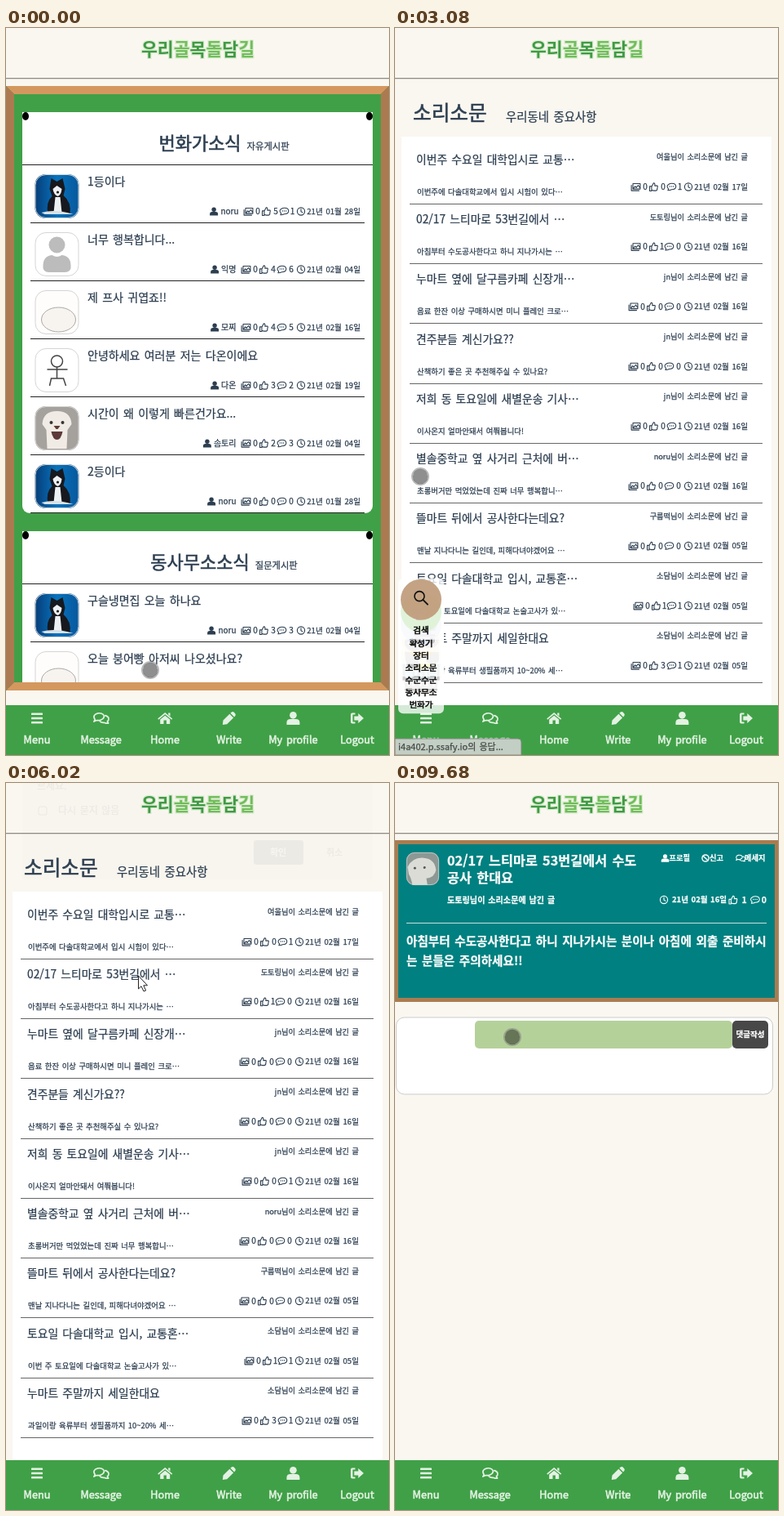
Animation, 470 px wide and 890 px high, one loop 9760 ms. Source, as an HTML page:

```html
<!DOCTYPE html>
<html lang="ko">
<head>
<meta charset="utf-8">
<title>동네 게시판</title>
<style>
html, body { margin: 0; width: 100%; height: 100%; overflow: hidden; background: #faf7f0; }
svg { display: block; width: 100%; height: 100%; }
text { font-family: "Noto Sans CJK KR", "Noto Sans CJK", sans-serif; fill: currentColor; stroke: currentColor; stroke-width: .25; word-spacing: .1em; white-space: pre; }
.semi { stroke-width: .6; }
.logo { stroke: #d9edcf; stroke-width: 2.4; paint-order: stroke; font-weight: 900; }
.o { fill: none; stroke: currentColor; stroke-width: 1.1; stroke-linejoin: round; stroke-linecap: round; }
.f { fill: currentColor; }
</style>
</head>
<body>
<svg id="stage" viewBox="0 0 470 890" color="#2c3e50"></svg>
<script>
const LOOP = 9760, GREEN = '#40a047', BROWN = '#a97c50';

// Drawing helpers
const text = (x, cy, s, size, attr = '') =>
  `<text x="${x}" y="${cy + size * .36}" font-size="${size}" ${attr}>${s}</text>`;
const rect = (x, y, w, h, fill, r = 0, attr = '') =>
  `<rect x="${x}" y="${y}" width="${w}" height="${h}" rx="${r}" fill="${fill}" ${attr}/>`;
const circle = (x, y, r, attr) => `<circle cx="${x}" cy="${y}" r="${r}" ${attr}/>`;
const path = (d, attr) => `<path d="${d}" ${attr}/>`;
const rule = (x1, x2, y, color = '#222') => rect(x1, y, x2 - x1, 1, color);
const icon = (id, x, y, k = 1) => `<use href="#${id}" transform="translate(${x} ${y}) scale(${k})"/>`;
const group = (id, body) => `<g id="${id}">${body}</g>`;
const strong = body => `<g color="#fff" font-weight="700">${body}</g>`;
const END = 'text-anchor="end"', MID = 'text-anchor="middle"', SEMI = 'class="semi"';
const O = 'class="o"', F = 'class="f"';

const icons = {
  user: circle(0, -2.3, 2.7, F) + path('M-5 5V3.4Q-5 .6-2 .6H2Q5 .6 5 3.4V5Z', F),
  image: path('M-3.5-4H5.4V2.6H-3.5ZM-5.4-2V4.6H4M-3 1.8L-.8-.6 .6.8 3-2 5 1', O),
  thumb: path('M-5-.6H-2.6V5H-5ZM-2.6-.2L-.2-4.8Q1.8-5 1.3-1.4H4.6Q5.2 0 4.4 1 4.6 4.4 2.8 4.6H-.6L-2.6 3.8', O),
  comment: path('M-4.6 4.2L-3.8 2.4C-8-1.5-3-4.2 0-4.2C7-4.2 7 3.2 0 3.2C-1.6 4-3 4.4-4.6 4.2Z', O) +
    [-2.2, 0, 2.2].map(x => circle(x, -.5, .7, F)).join(''),
  clock: circle(0, 0, 4.6, O) + path('M0-2.8V.2L2 1.4', O),
  ban: circle(0, 0, 4.3, O + ' style="stroke-width:1.5"') + path('M-3-3L3 3', O + ' style="stroke-width:1.5"'),
  reply: path('M.5-4.5L5.5-.7 .5 3V1Q-3.5.6-4 4.5Q-7-2.4.5-2.4Z', F),
  chats: path('M-5.6 2.6L-4.8 1C-8.4-4 1.5-6 2.5-1.5C2 1.4-1.6 2-3.4 1.6ZM3.4-2.2C7-1 6.4 1.6 5 2.4L5.8 4C4 4.1 3 3.6 2.4 3.4C.6 3.6-.6 3-1 2.2', O),
  bars: [-5.2, 0, 5.2].map(y => rect(-7, y - 1.3, 14, 2.6, 'currentColor', .6)).join(''),
  home: path('M-9 .6L0-7 9 .6 8 1.8 0-4.8-8 1.8ZM-6 1.6L0-3.3 6 1.6V7H1.7V2.6H-1.7V7H-6ZM4-6.6H6.3V-2.4L4-4.2Z', F),
  pen: path('M-8 8L-7.3 2.6 .6-5.3 5.3-.6-2.6 7.3ZM1.6-6.3L3-7.6Q4.5-8.6 5.8-7.4L7.4-5.8Q8.6-4.5 7.6-3L6.3-1.6Z', F),
  exit: path('M-2.5-6.5H-6Q-8-6.5-8-4.5V4.5Q-8 6.5-6 6.5H-2.5V4.4H-5.5V-4.4H-2.5ZM1.3-6L8 0 1.3 6V2.4H-3.7V-2.4H1.3Z', F),
};

// Avatars on a 54 x 54 tile
const tile = fill => rect(0, 0, 54, 54, fill, 13);
const pics = {
  husky: tile('url(#blue)') +
    path('M16 49Q13 34 21 27L18 18 20 5 27 9 34 5 37 18 35 26Q45 34 43 49Z', 'fill="#17191f"') +
    path('M22 18L27 14 33 18Q32 26 28 27 23 25 22 18ZM25 28H31L33 47H23Z', 'fill="#eef1f4"') +
    path('M8 47Q25 42 47 49H12Z', 'fill="#d7e2e8"') + circle(28, 22, 1.6, 'fill="#111"'),
  person: tile('#fff') + circle(27, 15.5, 10, 'fill="#bcbcbc"') +
    path('M10 44Q9 29 21 28 27 32 33 28 45 29 44 44 43 49 36 49H18Q11 49 10 44Z', 'fill="#bcbcbc"'),
  plush: tile('#fffdfb') + '<ellipse cx="29" cy="36" rx="21" ry="15" fill="#f7f3ef" stroke="#aaa"/>',
  stick: tile('#fff') + circle(27, 16, 7, 'fill="none" stroke="#444" stroke-width="1.5"') +
    path('M27 23V37M15 26H40M18 46L20 37H35L38 46', 'fill="none" stroke="#444" stroke-width="1.5"'),
  puppy: tile('#a5a19d') + path('M9 22Q10 6 27 6 44 6 45 22L40 29 39 52H15L14 29Z', 'fill="#f0ebe4"') +
    circle(20, 20, 2, 'fill="#333"') + circle(34, 20, 2, 'fill="#333"') +
    path('M23 24H31L28 28H26ZM20 31H34Q32 41 27 41 22 41 20 31Z', 'fill="#5c3a39"'),
  doll: tile('#8d9894') + path('M2 24Q10 8 28 9 47 10 49 29 47 41 33 43L35 54H10Q8 42 4 36Z', 'fill="#dcdcd6"') +
    circle(14, 26, 2, 'fill="#555"') + circle(30, 25, 2, 'fill="#555"'),
  meat: tile('#7c8180') + path('M6 29L21 10 45 17 49 34 31 47 13 42Z', 'fill="#a5544b"') +
    path('M12 29L24 16M20 36L34 18M29 41L43 24', 'stroke="#e2aa9c" stroke-width="4"'),
};
const avatar = (id, x, y, size = 54) =>
  `<g transform="translate(${x} ${y}) scale(${size / 54})">${pics[id]}` +
  rect(.5, .5, 53, 53, 'none', 13, 'stroke="#d5d5d5"') + '</g>';

const textWidth = (s, size) => [...s].reduce((w, c) => w + (c > '\u3000' ? .92 : .56), 0) * size;

// Counts and date, laid out from the right edge
function meta(right, y, counts, date, name) {
  let x = right - 81.5;
  let out = text(right, y, `21년 ${date}일`, 9.6, END) + icon('clock', right - 73, y);
  ['comment', 'thumb', 'image'].forEach((id, i) => {
    const n = counts[2 - i], w = n === '1' ? 4 : 7;
    out += text(x - w / 2, y, n, 10, MID) + icon(id, x - w - 8, y);
    x -= w + 15;
  });
  if (name) out += text(x - 5, y, name, 10, END) + icon('user', x - 13 - textWidth(name, 10), y);
  return out;
}

function card(y, title, sub, rows) {
  let out = rect(20, y, 430, 491, '#fff', 9) + rect(20, y, 430, 20, '#fff') +
    [24, 446].map(x => `<ellipse cx="${x}" cy="${y + 5}" rx="4" ry="5"/>`).join('') +
    text(267.5, y + 38, `${title}<tspan font-size="11.3" stroke-width=".25" dx="7">${sub}</tspan>`, 22, `${MID} ${SEMI}`) +
    rule(20, 450, y + 64);
  rows.forEach(([pic, head, name, counts, date], i) => {
    const top = y + 65 + 71 * i;
    out += avatar(pic, 35.5, top + 11) + text(100, top + 20, head, 14) +
      meta(435, top + 56.5, counts, date, name) + rule(30, 440, top + 70);
  });
  return out;
}

const home = rect(0, 71, 470, 740, GREEN) +
  `<g clip-path="url(#board)">` +
  card(103, '번화가소식', '자유게시판', [
    ['husky', '1등이다', 'noru', '051', '01월 28'],
    ['person', '너무 행복합니다...', '익명', '046', '02월 04'],
    ['plush', '제 프사 귀엽죠!!', '모찌', '045', '02월 16'],
    ['stick', '안녕하세요 여러분 저는 다온이에요', '다온', '032', '02월 19'],
    ['puppy', '시간이 왜 이렇게 빠른건가요...', '솜토리', '023', '02월 04'],
    ['husky', '2등이다', 'noru', '000', '01월 28'],
  ]) +
  card(616, '동사무소소식', '질문게시판', [
    ['husky', '구슬냉면집 오늘 하나요', 'noru', '033', '02월 04'],
    ['plush', '오늘 붕어빵 아저씨 나오셨나요?', '모찌', '000', '02월 04'],
  ]) + '</g>' +
  path('M0 71H470L460 81H10Z', 'fill="#d4985f"') + path('M0 811H470L460 801H10Z', 'fill="#d4985f"') +
  path('M0 71L10 81V801L0 811Z', 'fill="#ab7a51"') + path('M470 71L460 81V801L470 811Z', 'fill="#ab7a51"');

const posts = [
  ['이번주 수요일 대학입시로 교통…', '여울', '이번주에 다솔대학교에서 입시 시험이 있다…', '001', '17'],
  ['02/17 느티마로 53번길에서 …', '도토링', '아침부터 수도공사한다고 하니 지나가시는 …', '010', '16'],
  ['누마트 옆에 달구름카페 신장개…', 'jn', '음료 한잔 이상 구매하시면 미니 플레인 크로…', '000', '16'],
  ['견주분들 계신가요??', 'jn', '산책하기 좋은 곳 추천해주실 수 있나요?', '000', '16'],
  ['저희 동 토요일에 새별운송 기사…', 'jn', '이사온지 얼마안돼서 여쭤봅니다!', '001', '16'],
  ['별솔중학교 옆 사거리 근처에 버…', 'noru', '초롱버거만 먹었었는데 진짜 너무 행복합니…', '000', '16'],
  ['뜰마트 뒤에서 공사한다는데요?', '구름떡', '맨날 지나다니는 길인데, 피해다녀야겠어요 …', '000', '05'],
  ['토요일 다솔대학교 입시, 교통혼…', '소담', '이번 주 토요일에 다솔대학교 논술고사가 있…', '011', '05'],
  ['누마트 주말까지 세일한대요', '소담', '과일이랑 육류부터 생필품까지 10~20% 세…', '031', '05'],
];
const by = name => `${name}님이 소리소문에 남긴 글`;

const list = text(22, 104, '소리소문', 24.6, SEMI) + text(136, 109, '우리동네 중요사항', 14.4) +
  rect(8, 133, 454, 700, '#fff') +
  posts.map(([head, name, sub, counts, day], i) => {
    const y = 161 + 73.25 * i;
    return text(26, y, head, 13.8) + text(27, y + 39.5, sub, 9.4) + text(433, y - 3, by(name), 9.2, END) +
      meta(433, y + 33.5, counts, '02월 ' + day) + rule(18, 451, Math.round(y + 53.9), '#666');
  }).join('');

const labelled = (id, x, y, s) => icon(id, x, y, .95) + text(x + 5, y, s, 9.2);

function detail({ pic, head, name, day, likes, replies, body, reply }) {
  let out = rect(0, 70, 470, 198, BROWN) + rect(4, 75, 462, 188, '#008080') + avatar(pic, 14, 85, 40) + strong(
    head.map((s, i) => text(64, 95 + 21 * i, s, 16.3)).join('') +
    text(64, 143, by(name), 10.1) +
    labelled('user', 331.5, 92, '프로필') + labelled('ban', 381, 92, '신고') + labelled('chats', 424, 92, '메세지') +
    icon('clock', 330, 143) + text(340, 143, `21년 02월 ${day}일`, 9.5) +
    icon('thumb', 415, 143) + text(428.5, 143, likes, 10.5, MID) +
    icon('comment', 442, 143) + text(456, 143, replies, 10.5, END) +
    body.map((s, i) => text(14, 194 + 24 * i, s, 14.6)).join('')) +
    rule(14, 456, 171, '#c5e2e2');
  const y = reply ? 393 : 291;
  out += rect(1.5, 287, 462, y - 197, '#fff', 10, 'stroke="#ccc"');
  if (reply) out += avatar('meat', 7, 296, 40) + text(56, 326, reply.name, 11.5) +
    labelled('reply', 224, 328, '대댓글 달기') + labelled('ban', 290, 328, '댓글신고') +
    labelled('comment', 344, 328, '메세지 보내기') + labelled('user', 419, 328, '프로필') +
    rect(7, 336, 451, 52, BROWN, 5) +
    strong(text(12, 351, reply.text, 12.8) + text(12, 373, reply.date, 9.8));
  return out + rect(98, y, 316, 34, '#b5d19a', 5) + rect(414, y, 44, 34, '#484848', 5) +
    strong(text(436, y + 17, '댓글작성', 9.5, MID));
}

const notice = detail({
  pic: 'person', head: ['이번주 수요일 대학입시로 교통혼잡', '예상'], name: '여울', day: 17, likes: 0, replies: 1,
  body: ['이번주에 다솔대학교에서 입시 시험이 있다고 하네요! 교통혼잡이 예상', '되니 지하철을 이용하시는 걸 추천드립니다!!'],
  reply: { name: '도도리콩콩', text: '오우,,,,,지하철 출근하겠습니다 감사^^..', date: '21년 02월 19일 02시 37 분' },
});
const works = detail({
  pic: 'doll', head: ['02/17 느티마로 53번길에서 수도', '공사 한대요'], name: '도토링', day: 16, likes: 1, replies: 0,
  body: ['아침부터 수도공사한다고 하니 지나가시는 분이나 아침에 외출 준비하시', '는 분들은 주의하세요!!'],
});

const header = rect(0, 0, 470, 61, '#faf7f0') + rect(0, 61, 470, 1, '#8d8b85') + rect(0, 62, 470, 1, '#dcd8d0') +
  text(235.5, 26, [...'우리골목돌담길'].map((c, i) =>
    `<tspan fill="${'0010101'[i] === '1' ? '#72bd5c' : '#409a45'}">${c}</tspan>`).join(''), 21.6, `${MID} class="logo"`);

const tabs = [['bars', 'Menu'], ['chats', 'Message', 1.55], ['home', 'Home'], ['pen', 'Write'], ['user', 'My profile', 1.6], ['exit', 'Logout']];
const nav = rect(0, 829, 470, 61, GREEN) + '<g color="#e3f2e3">' + tabs.map(([id, s, k], i) => {
  const x = 38 + 78.6 * i;
  return icon(id, x, 845, k) + text(x, 871, s, 12.7, `${MID} ${SEMI}`);
}).join('') + '</g>';

// Round side menu, drawn around each circle's centre
const thick = (w, c = '#111') => `fill="none" stroke="${c}" stroke-width="${w}" stroke-linecap="round"`;
const windows = (xs, ys, c) => xs.map(x => ys.map(y => rect(x, y, 3, 4, c)).join('')).join('');
const menu = [
  ['검색', '#c2a07f', circle(-2, -4, 6, thick(1.6)) + path('M2.5 .5L8 6', thick(2))],
  ['확성기', '#6dc94b', path('M-11-4H-3Q5-5 9-11V9Q5 3-3 2H-11ZM-8 3H-3L-1 10H-6ZM10-3Q13-1 10 2Z', '') +
    path('M-1-2Q4-3 6-6V4Q4 1-1 0Z', 'fill="#6dc94b"')],
  ['장터', '#6f95c3', path('M-21-12H-14L-7 14H16', thick(3)) + path('M-14-8H23L17 8H-9Z', '') +
    circle(-4, 20, 4, '') + circle(13, 20, 4, '')],
  ['소리소문', '#f8ca60', circle(-9, 7, 11, '') + circle(11, 3, 11, '') +
    path('M-16 8Q-10 15-4 9M5 6Q10 12 17 6', thick(2, '#f8ca60'))],
  ['수군수군', '#efe43c', path('M-14-13Q-2-20 4-10L3 8Q4 14-3 14V22H-17Q-24 0-14-13Z', '') +
    circle(-3, -4, 2, 'fill="#efe43c"') + path('M8 12V-5M12 12V-9M16 12V-8M20 12V-4', thick(3.5)) + rect(6, 5, 16, 13, '#111', 5)],
  ['동사무소', '#4bcdf0', path('M-21 22V-4H-9V-18H9V-4H21V22ZM-9 22V-4M9 22V-4M-3 22V13H3V22', thick(3)) +
    windows([-5, 2], [-12, -5, 2], '#111') + windows([-17, 13], [2, 10], '#111')],
  ['번화가', '#bf9a78', path('M-20 21V0H-14V-8H-8V4H-4V-16H2V-2H5V-12H11V2H15V-4H20V21Z', '') +
    windows([-17, -11, -2, 6, 14], [5, 12], '#bf9a78')],
];
const menuItems = menu.map(([label, color, art], i) => group('item' + i,
  rect(4, -26, 56, 75, '#fff', 6, 'opacity=".78"') + circle(32, 0, 25, `fill="${color}" opacity=".96"`) +
  `<g transform="translate(32 0)">${art}</g>` + text(32, 38, label, 10.6, `${MID} ${SEMI} color="#111"`)));

const status = path('M0 870H151Q155 870 155 874V890H0Z', 'fill="#c3cec4" stroke="#7d8a7e"') +
  text(4, 880, 'i4a402.p.ssafy.io의 응답...', 11, 'color="#454b46"');
const dialog = rect(20, -20, 430, 138, '#777', 4, 'opacity=".25"') + text(38, 4, '르세요.', 12) +
  rect(40, 29, 10, 10, 'none', 2, 'stroke="#333"') + text(64, 34, '다시 묻지 않음', 12) +
  rect(304, 70, 61, 30, '#456', 3) + text(334, 85, '확인', 11, MID + ' color="#fff"') + text(403, 85, '취소', 11, MID);
const touch = circle(0, 0, 10, thick(2, 'rgba(128,128,128,.55)')) + circle(0, 0, 9.2, 'fill="#000" opacity=".44"');
const arrow = path('M162.5 236V252L166 248.8 169 255 171.6 254 168.8 247.8H173.5Z', 'fill="#fff" stroke="#222"');

const stage = document.getElementById('stage');
stage.innerHTML = '<defs><clipPath id="board"><rect x="10" y="81" width="450" height="720"/></clipPath>' +
  '<linearGradient id="blue"><stop stop-color="#063d78"/><stop offset=".5" stop-color="#0873bd"/><stop offset="1" stop-color="#07579c"/></linearGradient>' +
  Object.entries(icons).map(([id, body]) => group(id, body)).join('') + '</defs>' +
  rect(0, 0, 470, 890, '#faf7f0') + group('home-page', home) + group('list', list) + group('notice', notice) +
  group('works', works) + header + nav + group('dialog', dialog) +
  group('menu', menuItems.reverse().join('')) + group('status', status) + group('touch', touch) + group('arrow', arrow);

const el = id => document.getElementById(id);
const show = (id, on) => el(id).setAttribute('display', on ? 'inline' : 'none');
const fade = (id, a) => { show(id, a > 0); el(id).setAttribute('opacity', a); };
const clamp = x => Math.max(0, Math.min(1, x));
const easeOut = x => 1 - (1 - x) ** 2;
const ramp = (t, from, to) => clamp((t - from) / (to - from));
const within = (t, from, to) => t >= from && t < to;

// time, x, y
const trail = [
  [30, 177, 786], [600, 41, 864], [1740, 41, 864], [2690, 31, 549], [3150, 31, 549], [3690, 192, 460],
  [3780, 192, 460], [3990, 168, 223], [4370, 168, 223], [4460, 175, 185], [6020, 175, 185], [6021, 162, 238],
  [6490, 162, 238], [7200, 145, 238], [7700, 145, 238], [8100, 185, 150], [8420, 60, 102], [8670, 26, 92],
  [9020, 227, 110], [9370, 55, 255], [9660, 144, 311],
];
function touchAt(t) {
  const i = trail.findIndex(k => k[0] > t);
  if (i === 0) return trail[0].slice(1);
  if (i < 0) return trail[trail.length - 1].slice(1);
  const [t0, x0, y0] = trail[i - 1], [t1, x1, y1] = trail[i];
  const u = ramp(t, t0, t1), s = u * u * (3 - 2 * u);
  return [x0 + (x1 - x0) * s, y0 + (y1 - y0) * s];
}

function draw(t) {
  show('home-page', t < 2770);
  show('list', within(t, 2770, 4370) || within(t, 6020, 6490));
  show('notice', within(t, 4370, 6020));
  show('works', t >= 6490);

  const open = t < 2770 ? easeOut(ramp(t, 700, 1264)) : 1 - easeOut(ramp(t, 2770, 3334));
  fade('menu', clamp(open * 5));
  menu.forEach((_, i) => {
    const y = 794 + (325 + 75 * i - 794) * open;
    el('item' + i).setAttribute('transform', `translate(0 ${y})`);
  });

  fade('status', t < 2770 ? 0 : t < 6490 ? 1 - ramp(t, 4620, 4840) : 1 - ramp(t, 7120, 7350));
  fade('dialog', t < 6020 ? 0 : .07 * (1 - ramp(t, 6020, 6340)));
  show('arrow', within(t, 6020, 6340));
  show('touch', !within(t, 6020, 6340));
  el('touch').setAttribute('transform', `translate(${touchAt(t)})`);
}

function tick() {
  draw(performance.now() % LOOP);
  requestAnimationFrame(tick);
}
tick();
</script>
</body>
</html>
```
